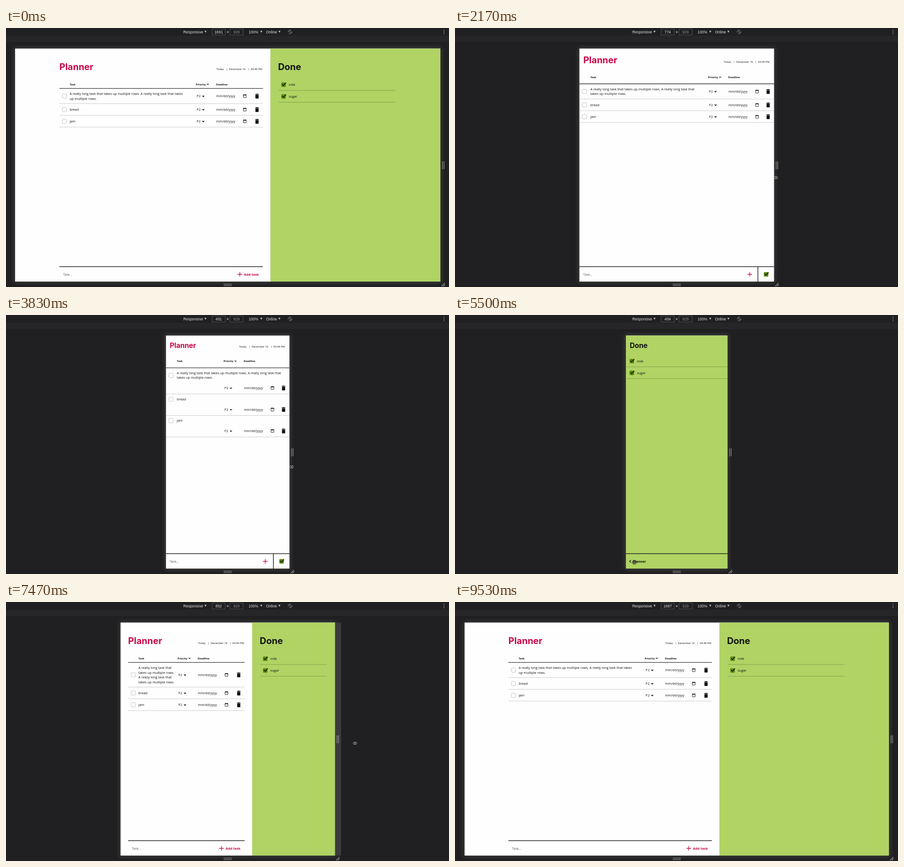
An HTML page that plays this animation: 977x573 px, repeating every 9560 ms.

```html
<!DOCTYPE html>
<html lang="en">
<head>
<meta charset="utf-8">
<title>Planner</title>
<style>
html, body { margin: 0; width: 100%; height: 100%; overflow: hidden; background: #202022; }
svg { display: block; width: 977px; height: 573px; }
text { font-family: "Open Sans", "Noto Sans", sans-serif; white-space: pre; }
text.head { font-family: Inter, sans-serif; }
text.bar { font-family: "Liberation Sans", Arial, sans-serif; }
</style>
</head>
<body>
<svg id="stage" viewBox="0 0 977 573"></svg>
<script>
const LOOP = 9560, SCALE = 0.5546, MID = 489, TOP = 45.5, BOTTOM = 561;
const RED = '#c80649', GREEN = '#b0d364', WHITE = '#fffeff';
const BODY = 7.35, LINE = 10.5;
const LONG = 'A really long task that takes up multiple rows. A really long task that takes up multiple rows.';

// viewport width over time: [ms, css px]
const WIDTHS = [[0, 1691], [600, 1691], [970, 1650], [1930, 870], [2170, 774], [2430, 754],
  [2630, 754], [3600, 505], [3830, 491], [4070, 491], [4650, 404], [6000, 404], [6670, 555],
  [7000, 560], [7470, 852], [7870, 955], [8130, 960], [8670, 1369], [9070, 1640], [9530, 1687]];
// pointer: [ms, x from the right page edge, y]
const POINTER = [[300, 30, 300], [650, 5, 320], [2170, 4, 331], [3830, 5, 336], [4650, 5, 338],
  [5000, -17, 545], [5100, -17, 545], [5430, -205.5, 547], [5580, -205.5, 547], [5900, 6, 330],
  [6670, 8, 322], [7000, 8, 318], [7470, 44.5, 312.5], [7870, 12, 316], [8130, 12, 318],
  [8670, 65, 324.5], [9070, 30, 326], [9400, 30, 326]];

function at(keys, t, col = 1) {
  const i = keys.findIndex(k => k[0] > t);
  if (i === 0) return keys[0][col];
  if (i < 0) return keys[keys.length - 1][col];
  const a = keys[i - 1], b = keys[i];
  return a[col] + (b[col] - a[col]) * (t - a[0]) / (b[0] - a[0]);
}

const stage = document.getElementById('stage');
const pen = document.createElement('canvas').getContext('2d');
let out;

const rect = (x, y, w, h, fill, extra = '') =>
  out += `<rect x="${x}" y="${y}" width="${w}" height="${h}" fill="${fill}" ${extra}/>`;
const path = (d, color, width = 1, fill = 'none') =>
  out += `<path d="${d}" stroke="${color}" stroke-width="${width}" fill="${fill}"/>`;
const hline = (x1, x2, y, color, width) => path(`M${x1} ${y}H${x2}`, color, width);
// y is the middle of the capitals
const text = (s, x, y, size = BODY, { weight = 500, color = '#111', anchor = 'start', cls = '' } = {}) =>
  out += `<text class="${cls}" x="${x}" y="${y + size * 0.36}" font-size="${size}" font-weight="${weight}" fill="${color}" text-anchor="${anchor}">${s}</text>`;

function wrap(s, width) {
  pen.font = '500 73.5px "Open Sans", "Noto Sans", sans-serif';
  const lines = [''];
  for (const word of s.split(' ')) {
    const last = lines[lines.length - 1], next = last ? last + ' ' + word : word;
    if (last && pen.measureText(next).width / 10 > width) lines.push(word);
    else lines[lines.length - 1] = next;
  }
  return lines;
}

const chevron = (x, y, w) => path(`M${x - 2} ${y - 1}l2 2 2-2`, '#111', w);
const plus = (x, y) => path(`M${x - 5} ${y}h10M${x} ${y - 5}v10`, RED, 1.3);
function ticked(x, y) {
  rect(x - 5, y - 5, 10, 10, '#5c8c02', 'rx="2"');
  path(`M${x - 3} ${y - 1}l2.7 2.8 5.8-6.2`, '#111', 1.6);
}
function calendar(x, y) {
  rect(x - 3.2, y - 2.8, 6.4, 6.2, 'none', 'rx=".5" stroke="#111" stroke-width=".9"');
  path(`M${x - 3.4} ${y - 2.4}h6.8`, '#111', 1.6);
  path(`M${x - 2} ${y - 4}v1M${x + 2} ${y - 4}v1`, '#111', 0.9);
}
function trash(x, y) {
  rect(x - 4, y - 4.6, 8, 1.4, '#111');
  rect(x - 1.6, y - 5.3, 3.2, 1, '#111');
  rect(x - 3.5, y - 2.6, 7, 7.9, '#111', 'rx=".9"');
}

function toolbar(width) {
  const bar = (s, x, color = '#dedede', anchor = 'start') =>
    text(s, x, 8.8, 8.4, { weight: 400, color, anchor, cls: 'bar' });
  rect(0, 17, 977, 14, '#262628');
  bar('Responsive', 391);
  bar('100%', 535);
  bar('Online', 573.5);
  for (const x of [440, 563, 603]) path(`M${x - 2.3} 6.2h4.6l-2.3 4.4z`, 'none', 0, '#c4c4c4');
  for (const x of [454.5, 494]) rect(x, 2, 29, 13.5, 'none', 'stroke="#505052"');
  bar(Math.round(width), 469, '#dedede', 'middle');
  bar('929', 508.5, '#8b8b8d', 'middle');
  path('M486.8 6.8l4.4 4.4m0-4.4l-4.4 4.4', '#d0d0d0', 0.9);
  path('M622.3 9.8A4.3 4.3 0 0 1 629 5.3M630.7 7.6A4.3 4.3 0 0 1 624 12.1M623.8 6.8l2-1.7 3.7 4.6-2 1.7z', '#8b8b8d', 0.9);
  for (const y of [5, 8.8, 12.6]) rect(965.2, y - 0.8, 1.6, 1.6, '#b0b0b0');
}

// x..xr is the table, mode is 'wide', 'tablet' or 'phone'
function planner(x, xr, mode) {
  const wide = mode === 'wide', phone = mode === 'phone';
  const pad = wide ? 0 : 8.5, col = wide ? xr : xr + 2.5;
  const titleY = wide ? 86 : phone ? 67 : 70.5;
  const dateY = wide ? 90.5 : phone ? 70 : 75;
  const headY = wide ? 124.5 : phone ? 102 : 108.7;
  const taskX = x + (wide ? 22.7 : 24), boxX = x + 11.3;
  let y = wide ? 133.7 : phone ? 116.8 : 123.5;

  text('Planner', x + pad, titleY, phone ? 15.4 : 20, { weight: 700, color: RED, cls: 'head' });
  for (const [s, dx] of [['Today', 102.5], ['|', 81], ['December 16', 75], ['|', 33], ['04:49 PM', 27]])
    text(s, xr - pad - dx, dateY, 5.9);
  for (const [s, px] of [['Task', taskX], ['Priority', col - 148], ['Deadline', col - 103.5]])
    text(s, px, headY, 5.8, { weight: 700 });
  chevron(col - 121.5, headY, 1.1);
  hline(x, xr, y, '#333', 1.3);

  const room = phone ? xr - 8.5 - taskX : (col - 148 - taskX) * 0.935;
  for (const task of [LONG, 'bread', 'jam']) {
    const lines = wrap(task, room), n = lines.length;
    const h = phone ? 37 + LINE * n : Math.max(26, 12.5 + LINE * n);
    const mid = phone ? y + 6.2 + LINE * n / 2 : y + h / 2 + 0.2;
    const ctl = phone ? y + h - 13.3 : mid;
    rect(boxX - 4.8, mid - 4.8, 9.6, 9.6, WHITE, 'rx="2" stroke="#b9b9b9" stroke-width=".9"');
    lines.forEach((s, i) => text(s, taskX, mid + (i - (n - 1) / 2) * LINE));
    text('P2', col - 146, ctl, 7.2);
    chevron(col - 131.5, ctl + 0.2, 1.5);
    text('mm/dd/yyyy', col - 103, ctl, 7.2);
    calendar(col - 40, ctl);
    trash(xr - 13, ctl);
    y += h;
    hline(x, xr, y, '#c2c2c2', 0.9);
  }

  hline(x, xr, 528, '#222', 1.5);
  text('Task...', x + 8.4, 545, 7.1, { weight: 400, color: '#555' });
  if (wide) {
    plus(xr - 51, 545);
    text('Add task', xr - 9, 545, 7.5, { weight: 700, color: RED, anchor: 'end' });
  } else {
    plus(xr - 53.5, 545);
    path(`M${xr - 35.5} 528V${BOTTOM}`, '#222', 1.5);
    ticked(xr - 17.5, 545);
  }
}

function doneList(iconX, x1, x2, y) {
  for (const s of ['milk', 'sugar']) {
    ticked(iconX, y);
    text(s, iconX + 11.3, y);
    hline(x1, x2, y + 12.7, '#7d9a45', 0.9);
    y += 26;
  }
}

function page(x0, w, css, done, fill) {
  const x1 = x0 + w;
  if (css >= 800) {
    const cw = Math.min(w, 776), left = x0 + (w - cw) / 2;
    const edge = left + 0.633 * cw - 9.1;
    rect(edge, TOP, x1 - edge, BOTTOM - TOP, GREEN);
    planner(left + 16.7, edge - 16.5, 'wide');
    text('Done', edge + 16.8, 86, 20, { weight: 700, cls: 'head' });
    doneList(edge + 29, edge + 18, left + cw - 18, 125.5);
  } else if (done) {
    rect(x0, TOP, w, BOTTOM - TOP, GREEN);
    text('Done', x0 + 8.5, 67, 15.4, { weight: 700, cls: 'head' });
    doneList(x0 + 13, x0 + 2, x1, 102);
    hline(x0, x1, 528, '#222', 1.5);
    path(`M${x0 + 11} 542l-3 3 3 3`, '#111', 1.3);
    text('Planner', x0 + 16, 545, 7.3, { weight: 700 });
  } else planner(x0, x1, css < 600 ? 'phone' : 'tablet');
}

function pointer(t, x1) {
  if (t < 300 || t > 9400) return;
  const dx = at(POINTER, t), x = x1 + dx, y = at(POINTER, t, 2);
  if (dx < 0) out += `<circle cx="${x}" cy="${y}" r="5" fill="#333" fill-opacity=".6" stroke="#222" stroke-opacity=".5" stroke-width=".6"/>`;
  else path(`M${x - 4.6} ${y}l3.2-3.2v2.2h2.8v-2.2l3.2 3.2-3.2 3.2v-2.2h-2.8v2.2z`, '#d8d8d8', 0.8, '#151515');
}

function draw(t) {
  const css = at(WIDTHS, t), w = css * SCALE, x0 = MID - w / 2, x1 = x0 + w;
  const growing = css - at(WIDTHS, t - 60) > 10 && t > 100;
  const lagging = growing && css > 1000;
  const tall = BOTTOM - TOP;
  out = '<filter id="glow" x="-10%" y="-10%" width="120%" height="120%"><feGaussianBlur stdDeviation="5"/></filter>';
  rect(0, 0, 977, 573, '#202022');
  rect(x0 - 2, TOP - 2, w + 4, tall + 4, '#3c3c3e', 'filter="url(#glow)"');
  toolbar(css);
  if (growing) rect(x1, TOP, 13.8, tall, '#3b3b3d');

  // while growing fast, the painted surface and its layout trail the frame
  const paintCss = lagging ? at(WIDTHS, t - 67) : css;
  const layCss = lagging ? at(WIDTHS, t - 166) : css;
  const pw = paintCss * SCALE, px = MID - pw / 2;
  if (lagging) rect(x0, TOP, w, tall, '#222224', 'stroke="#666"');
  rect(px, TOP, pw, tall, WHITE);
  page(px, layCss * SCALE, layCss, t >= 5050 && t < 5560);

  path(`M${x1 + 4.7} 295v17.5m3.4-17.5v17.5`, '#a5a5a5', 1.1);
  path('M480 566.8h18m-18 3.2h18', '#a5a5a5', 1.1);
  path(`M${x1 + 2.5} 571.5l7.5-7.5m-3.5 7.5l4-4`, '#a5a5a5', 1.1);
  pointer(t, x1);
  stage.innerHTML = out;
}

function tick() {
  draw(performance.now() % LOOP);
  requestAnimationFrame(tick);
}
tick();
</script>
</body>
</html>
```
